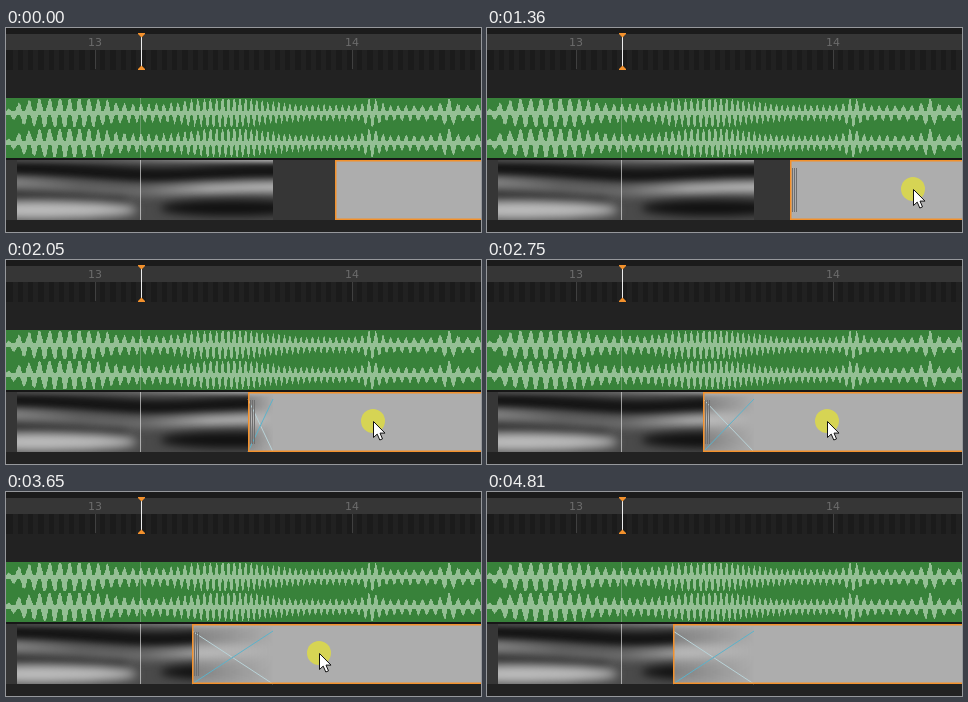
Animation of 475x204 px, one loop 6280 ms. Source, as an HTML page with a canvas:

```html
<!DOCTYPE html>
<html>
<head>
<meta charset="utf-8">
<style>
  html, body { margin: 0; width: 100%; height: 100%; overflow: hidden; background: #222; }
  canvas { display: block; }
</style>
</head>
<body>
<canvas id="stage" width="475" height="204"></canvas>
<script>
const W = 475, H = 204, LOOP = 6280;
const TOP = 132, BOTTOM = 192;      // clip track
const IMG_X = 11, IMG_END = 267;
const ORANGE = '#f3912c', CLIP = '#adadad';
const ENTER = 400, PRESS = 870, RELEASE = 4330, LEAVE = 4600, GONE = 4810;
const ctx = document.getElementById('stage').getContext('2d');

// The drag as [time, cursor x, clip x], linear in between.
const drag = [
  [PRESS, 454, 329], [1430, 422, 299], [2120, 361, 236], [2750, 340, 216],
  [3380, 317, 190], [3650, 313, 186], [3860, 310, 186]
];

function dragAt(t) {
  const i = drag.findIndex(key => key[0] > t);
  if (i === 0) return drag[0].slice(1);
  if (i < 0) return drag[drag.length - 1].slice(1);
  const a = drag[i - 1], b = drag[i], f = (t - a[0]) / (b[0] - a[0]);
  return [1, 2].map(n => Math.round(a[n] + (b[n] - a[n]) * f));
}

function cursorAt(t) {
  if (t < PRESS) {
    const k = Math.max(0, 1 - (t - ENTER) / 210) ** 1.5;
    return [454 + 6 * k, 166 + 28 * k];
  }
  if (t >= LEAVE) {
    const k = (t - LEAVE) / 140;
    return [324 + 89 * k, 164 + 34 * k];
  }
  return [dragAt(t)[0], 161 + 5 * Math.max(0, 1 - (t - PRESS) / 280)];
}

function held(t) {
  const start = [0, ENTER, PRESS, 1630, 3650, LEAVE].filter(s => s <= t).pop();
  return start + Math.floor((t - start) / 70) * 70;
}

function layer(w, h, draw) {
  const canvas = document.createElement('canvas');
  canvas.width = w;
  canvas.height = h;
  draw(canvas.getContext('2d'));
  return canvas;
}

function box(c, color, x, y, w, h) {
  c.fillStyle = color;
  c.fillRect(x, y, w, h);
}

function polygon(c, points) {
  c.beginPath();
  points.forEach(([x, y]) => c.lineTo(x, y));
  c.closePath();
}

function line(c, color, x1, y1, x2, y2) {
  c.strokeStyle = color;
  c.lineWidth = 1;
  c.beginPath();
  c.moveTo(x1, y1);
  c.lineTo(x2, y2);
  c.stroke();
}

function drawWave(c) {
  const bump = (x, center, width) => Math.exp(-(((x - center) / width) ** 2));
  let phase = 0, seed = 7;
  const random = () => (seed = seed * 16807 % 2147483647) / 2147483647;
  box(c, '#38823a', 0, 70, W, 60);
  for (let x = 0; x < W; x++) {
    phase += 2 * Math.PI / (8 + 2.5 * Math.cos(x / 85));
    const loud = 7 + 8 * bump(x, 60, 48) + 8 * bump(x, 220, 45) + 6 * bump(x, 365, 9) + 6 * bump(x, 442, 7);
    const amp = loud * Math.min(1, (x + 8) / 24);
    [85, 115].forEach(mid => {
      const swing = amp * 0.6 * Math.sin(phase);
      const core = amp * (0.4 + 0.25 * random());
      const up = Math.min(14, Math.max(2, core + swing));
      const down = Math.min(14, Math.max(2, core - swing));
      box(c, '#94bf94', x, mid - up, 1, up + down);
    });
  }
}

const picture = layer(IMG_END - IMG_X, 60, c => {
  box(c, '#4a4a4a', 0, 0, 256, 60);
  const fade = (...colors) => {
    const g = c.createLinearGradient(0, 0, 256, 0);
    colors.forEach((color, i) => g.addColorStop(i / (colors.length - 1), color));
    return g;
  };
  const band = (path, width, blur, style) => {
    c.filter = `blur(${blur}px)`;
    c.lineWidth = width;
    c.strokeStyle = style;
    c.stroke(new Path2D(path));
  };
  const blob = (x, y, rx, ry, blur, color) => {
    c.filter = `blur(${blur}px)`;
    c.fillStyle = color;
    c.beginPath();
    c.ellipse(x, y, rx, ry, 0, 0, 7);
    c.fill();
  };
  band('M-20 36 C30 35 70 38 110 36', 9, 4, '#2c2c2c');
  band('M-20 9 C60 8 110 16 150 15 S230 10 276 11', 14, 3, '#151515');
  band('M-20 -1 H276', 6, 2, fade('#444', '#555', '#888', '#bbb'));
  band('M-20 22 C50 23 90 33 135 31 S220 27 276 27', 10, 4, fade('#8a8a8a', '#666', '#707070', '#b4b4b4', '#c4c4c4'));
  blob(20, 50, 100, 9, 5, '#bcbcbc');
  blob(215, 48, 72, 8, 4, '#101010');
});

const backdrop = layer(W, H, c => {
  box(c, '#222', 0, 0, W, H);
  box(c, '#1b1b1b', 0, 0, W, 6);
  box(c, '#363636', 0, 6, W, 16);
  box(c, '#1b1b1b', 0, 22, W, 20);
  const step = 10.28;
  for (let x = 89 % step; x < W; x += step) box(c, '#212121', Math.round(x), 22, 5, 20);
  c.font = '11px "DejaVu Sans", sans-serif';
  c.textAlign = 'center';
  [['13', 89], ['14', 346]].forEach(([label, x]) => {
    c.fillStyle = '#6c6c6c';
    c.fillText(label, x, 18);
    box(c, '#404040', x, 22, 1, 19);
  });
  drawWave(c);
  box(c, '#171717', 0, 130, W, 2);
  box(c, '#363636', 0, TOP, W, BOTTOM - TOP);
  c.drawImage(picture, IMG_X, TOP);
});

function drawClip(x, hover) {
  box(ctx, CLIP, x, TOP, W - x, BOTTOM - TOP);
  const overlap = IMG_END - x;
  if (overlap > 0) {
    // The picture fades out under the incoming clip.
    for (let px = x; px < IMG_END; px++) {
      const column = [picture, px - IMG_X, 0, 1, 60, px, TOP, 1, 60];
      ctx.globalAlpha = 0.3 * (IMG_END - px) / overlap;
      ctx.drawImage(...column);
      ctx.globalCompositeOperation = 'screen';
      ctx.drawImage(...column);
      ctx.globalCompositeOperation = 'source-over';
    }
    ctx.globalAlpha = 1;
    line(ctx, '#b9d3d8', x, 139, IMG_END, BOTTOM);
    line(ctx, '#5bb3cb', x, BOTTOM, IMG_END, 139);
  }
  ctx.strokeStyle = ORANGE;
  ctx.lineWidth = 1.5;
  ctx.strokeRect(x + 0.75, TOP + 0.75, W, BOTTOM - TOP - 1.5);
  if (hover) for (let i = 2; i < 7; i += 2) box(ctx, '#6e6e6e', x + i, 140, 1, 44);
}

function drawPlayhead() {
  box(ctx, 'rgba(225,225,225,.3)', 134, 70, 1, 60);
  box(ctx, 'rgba(225,225,225,.65)', 134, TOP, 1, BOTTOM - TOP);
  box(ctx, '#eee', 135, 8, 1, 31);
  ctx.fillStyle = ORANGE;
  polygon(ctx, [[132, 5], [139, 5], [139, 6], [135.5, 9.5], [132, 6]]);
  ctx.fill();
  polygon(ctx, [[132, 42], [139, 42], [139, 41], [135.5, 37.5], [132, 41]]);
  ctx.fill();
}

function drawCursor(x, y, pressed) {
  if (pressed) {
    ctx.fillStyle = 'rgba(220,218,72,.88)';
    ctx.beginPath();
    ctx.arc(x, y, 12, 0, 7);
    ctx.fill();
  }
  ctx.save();
  ctx.translate(x + 0.5, y + 0.5);
  polygon(ctx, [[0, 0], [0, 16], [3.7, 12.6], [6.3, 18.5], [9, 17.4], [6.5, 11.6], [11.5, 11.6]]);
  ctx.fillStyle = '#fff';
  ctx.fill();
  ctx.strokeStyle = '#111';
  ctx.lineWidth = 1;
  ctx.stroke();
  ctx.restore();
}

function frame() {
  const now = performance.now() % LOOP, t = held(now);
  const [x, y] = cursorAt(t).map(Math.round);
  const visible = now >= ENTER && now < GONE;
  ctx.drawImage(backdrop, 0, 0);
  drawClip(dragAt(t)[1], visible && y < BOTTOM);
  drawPlayhead();
  if (visible) drawCursor(x, y, now >= PRESS && now < RELEASE);
  requestAnimationFrame(frame);
}
frame();
</script>
</body>
</html>
```
